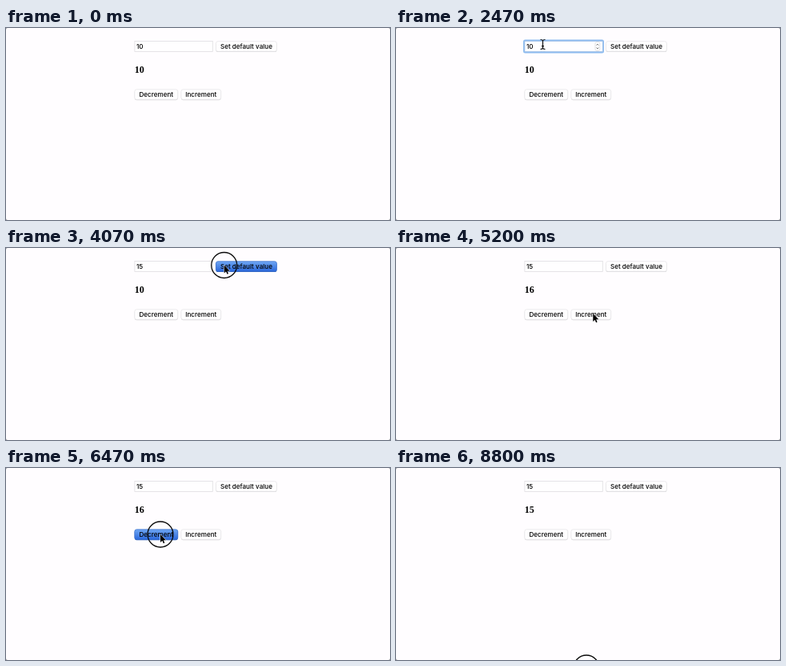
Animation of 480 by 240 pixels, one loop 8870 ms. Source, as an HTML page:

```html
<!DOCTYPE html>
<html lang="en">
<head>
<meta charset="utf-8">
<title>Counter</title>
<style>
  html, body { margin: 0; width: 100%; height: 100%; overflow: hidden; background: #8a898c; }
  svg { display: block; width: 480px; height: 240px; }
  text { font: 500 8.1px Inter, Roboto, sans-serif; fill: #000; }
  #count { font: bold 12px "Liberation Serif", "Times New Roman", serif; }
  .shade { fill: #d3d2d5; }
  .face { fill: #fffeff; stroke: #e4e3e6; stroke-width: .7; }
  .down .face { fill: url(#blue); stroke: #3a70cc; }
  .down .shade { fill: #2c5bb4; }
</style>
</head>
<body>
<svg viewBox="0 0 480 240">
  <defs>
    <linearGradient id="blue" x2="0" y2="1">
      <stop offset="0" stop-color="#6ea6f3"/>
      <stop offset="1" stop-color="#2b68dc"/>
    </linearGradient>
  </defs>
  <rect width="480" height="240" rx="2" fill="#fffdff"/>

  <rect id="ring" x="159" y="14.5" width="101" height="17" rx="2.5" fill="#8fbcf0"/>
  <rect id="field" x="160.9" y="16.4" width="97.4" height="13.2" fill="#fffeff" stroke-width=".8"/>
  <text id="value" x="162.9" y="26"></text>
  <rect id="caret" y="18.5" width=".9" height="9"/>
  <g id="spin">
    <rect x="249" y="17.6" width="5.8" height="10.8" rx="2" fill="#fff" stroke="#cfced1" stroke-width=".6"/>
    <path d="M250.6 21.6l1.3-1.5 1.3 1.5M250.6 24.5l1.3 1.5 1.3-1.5" fill="none" stroke="#555" stroke-width=".8"/>
  </g>

  <text id="count" x="160.7" y="56.2"></text>
  <g id="buttons"></g>

  <circle id="halo" r="16" fill="none" stroke="#0a0a0a" stroke-width="1.3"/>
  <path id="arrow" d="M0 0V9.9L2.3 7.8L3.8 11.2L5.3 10.5L3.9 7.2H7Z" stroke="#fff" stroke-width=".9" paint-order="stroke"/>
  <path id="beam" d="M-3-6Q-.5-6 0-4.8Q.5-6 3-6M0-4.8V4.8M-3 6Q-.5 6 0 4.8Q.5 6 3 6M-1.5 2.2H1.5" fill="none" stroke="#111" stroke-width="1.2"/>
</svg>

<script>
const LOOP = 8870, TICK = 1000 / 15;
const $ = id => document.getElementById(id);
const show = (id, on) => $(id).setAttribute("visibility", on ? "visible" : "hidden");
const within = (n, a, b) => n >= a && n < b;

function addButton(name, x, y, w) {
  const g = document.createElementNS("http://www.w3.org/2000/svg", "g");
  const box = `x="${x}" width="${w}" height="12.6" rx="2.6"`;
  g.innerHTML =
    `<rect class="shade" y="${y + .8}" ${box}/><rect class="face" y="${y}" ${box}/>` +
    `<text x="${x + w / 2}" y="${y + 9.4}" text-anchor="middle">${name}</text>`;
  $("buttons").append(g);
  return g;
}
const buttons = {
  set: addButton("Set default value", 262.4, 16.7, 76),
  dec: addButton("Decrement", 160.8, 76.8, 54),
  inc: addButton("Increment", 218.9, 76.8, 49.8)
};

const spots = {
  below: [238, 250], field: [177.5, 21], above: [181, 15], text: [183.5, 20.5],
  set: [272.7, 21.5], inc: [246.3, 82], dec: [193, 83]
};
const moves = [
  { from: 2, to: 18, spot: "field" },
  { from: 29, to: 31, spot: "above" },
  { from: 31, to: 33, spot: "text" },
  { from: 51, to: 60, spot: "set" },
  { from: 66, to: 73, spot: "inc" },
  { from: 84, to: 89, spot: "dec" },
  { from: 101, to: 111, spot: "below" }
];
const clicks = [
  { from: 22, to: 25 },
  { from: 61, to: 63, on: "set" },
  { from: 76, to: 78, on: "inc" },
  { from: 82, to: 84, on: "inc" },
  { from: 92, to: 94, on: "dec" },
  { from: 97, to: 98, on: "dec" },
  { from: 116, to: 117 },
  { from: 132, to: 134 }
];
const actions = { set: () => 15, inc: c => c + 1, dec: c => c - 1 };

function pointer(n) {
  let [x, y] = spots.below;
  for (const { from, to, spot } of moves) {
    const p = Math.min(1, Math.max(0, (n - from) / (to - from)));
    const e = p * p * (3 - 2 * p);
    x += (spots[spot][0] - x) * e;
    y += (spots[spot][1] - y) * e;
  }
  return [x, y];
}

function draw(t) {
  const n = Math.floor((t + 4) / TICK);
  const [x, y] = pointer(n);

  const click = clicks.find(c => within(n, c.from, c.to));
  const count = clicks.filter(c => c.on && n >= c.to)
    .reduce((c, { on }) => actions[on](c), 10);
  for (const id in buttons)
    buttons[id].setAttribute("class", click && click.on === id ? "down" : "");
  $("count").textContent = count;

  const value = n < 41 ? "10" : n < 45 ? "1" : "15";
  $("value").textContent = value;
  $("caret").setAttribute("x", value.length > 1 ? 171.6 : 167.2);
  show("caret", within(n, 29, 37) || within(n, 40, 53));

  const focus = within(n, 29, 61);
  show("ring", focus);
  $("field").setAttribute("stroke", focus ? "#9fc0e6" : "#dfdee1");

  const inField = n < 61 && x < 258;
  const beam = inField && n >= 29;
  const hidden = n < 6 || within(n, 42, 52);
  show("spin", inField && n >= 21);
  show("beam", beam && !hidden);
  show("arrow", !beam && !hidden);
  show("halo", click);
  for (const id of ["beam", "arrow", "halo"])
    $(id).setAttribute("transform", `translate(${x} ${y})`);
}

const start = performance.now();
function frame(now) {
  draw(Math.max(0, now - start) % LOOP);
  requestAnimationFrame(frame);
}
draw(0);
requestAnimationFrame(frame);
</script>
</body>
</html>
```
